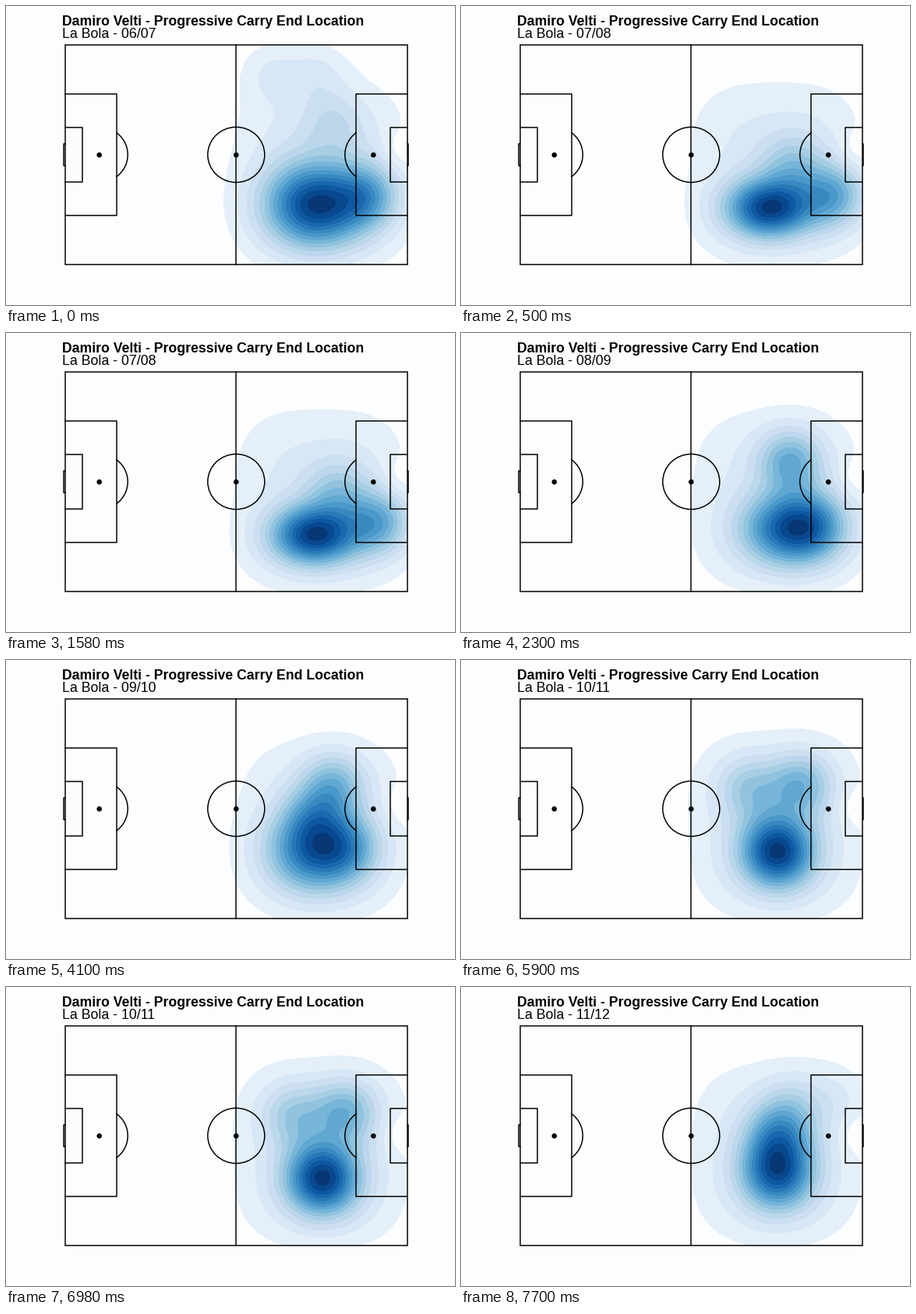
A matplotlib script for the animation above (8000 ms loop, 576x384 px).

```python
import numpy as np
import matplotlib.pyplot as plt
from matplotlib.animation import FuncAnimation
from matplotlib.patches import Arc, Circle, Ellipse, Rectangle

W, H, DPI = 576, 384, 96
PX = 72 / DPI  # points per pixel
BACKGROUND = "#fcfdff"
LAYERS = 16
STEP_MS, LOOP_MS, HOLD_MS, FIRST_MS = 100, 8000, 1800, 500

# Pitch geometry in pixels
LEFT, RIGHT, TOP, BOTTOM = 76, 515, 50, 332
MID_X, MID_Y = 295.3, 191
CIRCLE_W, CIRCLE_H = 73, 71
LINE = dict(color="black", lw=1.5 * PX, zorder=3)

CORE_HEIGHT, SIDE_SPREAD = 12, 28

# Per season: core centre, core spread, side humps as (x, y, height)
SEASONS = [
    ((398, 256), (44, 37), [(465, 244, 5), (420, 150, 2), (400, 85, 1.5), (340, 85, 1.5)]),
    ((396, 260), (38, 26), [(478, 243, 6), (425, 205, 3.5)]),
    ((424, 252), (42, 32), [(455, 245, 3), (422, 165, 6.5)]),
    ((398, 246), (42, 36), [(440, 240, 4), (395, 200, 4.5), (420, 160, 6)]),
    ((406, 246), (32, 32), [(435, 160, 5), (370, 165, 3.5)]),
    ((406, 236), (32, 34), [(408, 185, 5), (425, 150, 2), (480, 145, 1)]),
]

fig = plt.figure(figsize=(W / DPI, H / DPI), dpi=DPI, facecolor=BACKGROUND)
ax = fig.add_axes([0, 0, 1, 1])
ax.set(xlim=(0, W), ylim=(H, 0))
ax.axis("off")

x, y = np.meshgrid(np.linspace(260, RIGHT, 171), np.linspace(TOP, BOTTOM, 189))


def blob(cx, cy, sx, sy, power=2):
    """Bell of height 1; a higher power flattens its top."""
    return np.exp(-(np.abs((x - cx) / sx) ** power + np.abs((y - cy) / sy) ** power) / 2)


def heatmap(centre, spread, sides):
    # Every season covers the attacking half, thinning out by the goal mouth
    halo = 2.2 * blob(405, 214, 92, 96, power=3) * (1 - 0.8 * blob(508, 187, 16, 18))
    density = halo + CORE_HEIGHT * blob(*centre, *spread)
    for cx, cy, height in sides:
        density += height * blob(cx, cy, SIDE_SPREAD, SIDE_SPREAD)
    density *= (LAYERS - 0.4) / density.max()
    levels = np.arange(1, LAYERS + 1)
    colors = plt.get_cmap("Blues")((levels[:-1] + 0.5) / LAYERS)
    return ax.contourf(x, y, density, levels=levels, colors=colors, zorder=1)


def open_box(goal_x, depth, y0, y1):
    ax.plot([goal_x, goal_x + depth, goal_x + depth, goal_x], [y0, y0, y1, y1], **LINE)


def spot(cx):
    ax.add_patch(Circle((cx, MID_Y + 0.3), 3.3, color="black", lw=0, zorder=3))


def draw_pitch():
    ax.add_patch(Rectangle((LEFT, TOP), RIGHT - LEFT, BOTTOM - TOP, fill=False, **LINE))
    ax.plot([MID_X, MID_X], [TOP, BOTTOM], **LINE)
    ax.add_patch(Ellipse((MID_X, MID_Y), CIRCLE_W, CIRCLE_H, fill=False, **LINE))
    spot(MID_X)
    for goal_x, side, goal_depth in ((LEFT, 1, 2), (RIGHT, -1, 1)):
        open_box(goal_x, side * 66, 113, 269)
        open_box(goal_x, side * 22, 156, 226)
        open_box(goal_x, -side * goal_depth, 177, 205)
        spot_x = goal_x + side * 43.7
        spot(spot_x)
        facing = 90 - side * 90
        ax.add_patch(Arc((spot_x, MID_Y), CIRCLE_W, CIRCLE_H,
                         theta1=facing - 53, theta2=facing + 53, **LINE))


def label(baseline, text, size, weight="normal"):
    return ax.text(72, baseline, text, family="Liberation Sans", weight=weight,
                   size=size * PX, color="black", va="baseline", zorder=4)


heatmaps = [heatmap(*season) for season in SEASONS]
draw_pitch()
label(25, "Damiro Velti - Progressive Carry End Location", 17.6, "bold")
subtitle = label(41, "", 17.7)


def update(frame):
    current = (frame * STEP_MS + HOLD_MS - FIRST_MS) // HOLD_MS
    for i, layer in enumerate(heatmaps):
        layer.set_visible(i == current)
    year = 6 + current
    subtitle.set_text(f"La Bola - {year:02}/{year + 1:02}")
    return [*heatmaps, subtitle]


anim = FuncAnimation(fig, update, frames=LOOP_MS // STEP_MS, interval=STEP_MS,
                     repeat=True, repeat_delay=0, blit=False)
plt.show()
```
